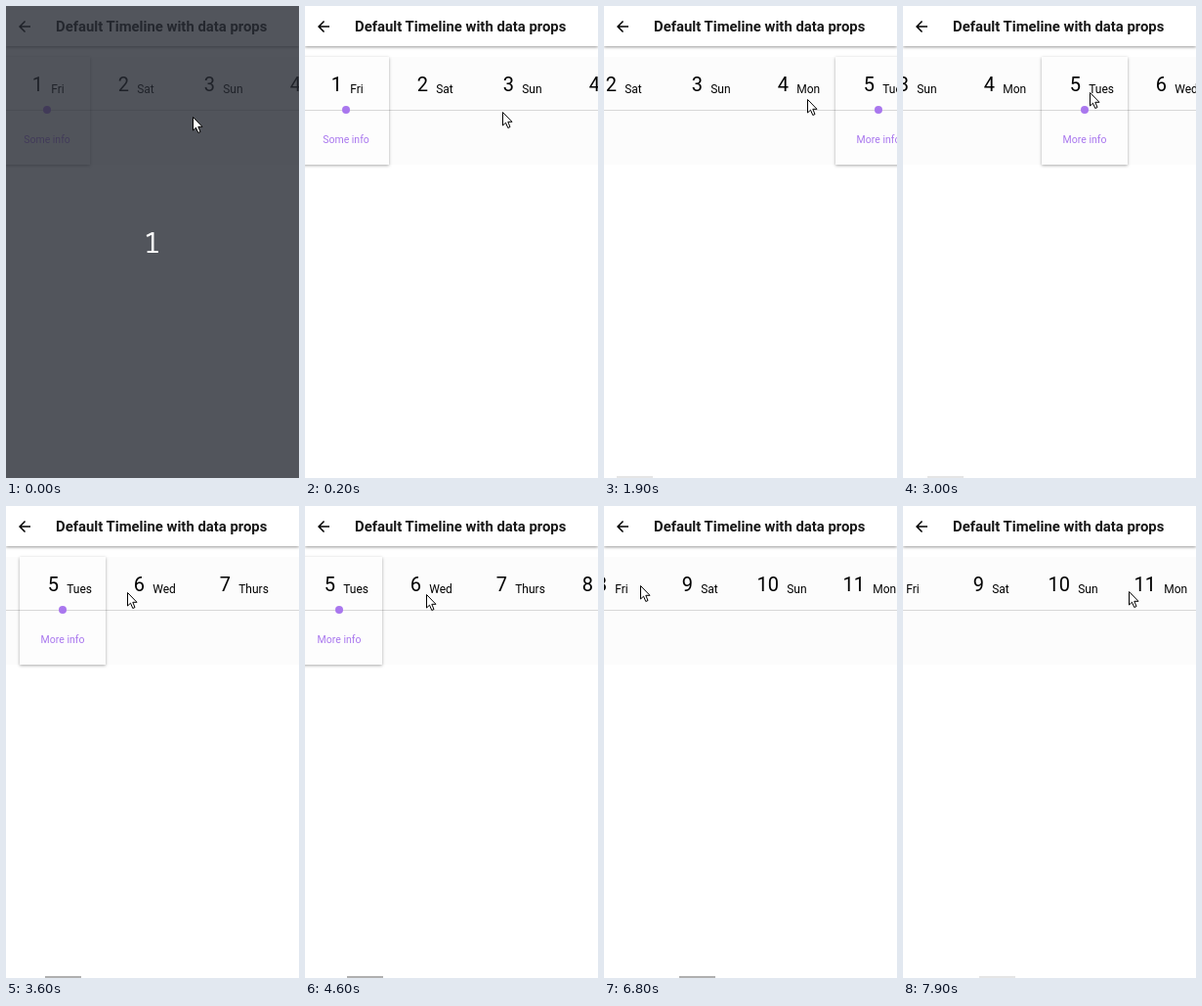
An HTML page for the animation above (8000 ms loop, 300x482 px).

```html
<!DOCTYPE html>
<html lang="en">
<head>
<meta charset="utf-8">
<title>Timeline</title>
<style>
  html, body { margin: 0; width: 100%; height: 100%; overflow: hidden; background: #fff; }
  #stage { position: relative; width: 300px; height: 482px; overflow: hidden; background: #fff;
    font-family: Roboto, sans-serif; color: #000; white-space: nowrap; }
  #stage div, #stage svg { position: absolute; }
  #header { left: 0; top: 0; width: 300px; height: 41px; background: #fff;
    box-shadow: 0 1px 3px rgba(0, 0, 0, .42); }
  #header svg { left: 10px; top: 12px; }
  #title { left: 51px; top: 12px; font: 700 14.87px/18px Roboto, sans-serif; color: #171717; }
  #band { left: 0; top: 52px; width: 300px; height: 110px; background: #fcfcfc; }
  #track, #dots { left: 0; top: 52px; }
  .day { top: 0; width: 88px; height: 110px; }
  .card { left: -2px; top: 0; width: 88px; height: 110px; background: #fdfdfd;
    box-shadow: 0 1px 3px rgba(0, 0, 0, .34); }
  .num { right: 50px; top: 16px; font-size: 20px; line-height: 24px; }
  .name { left: 46.2px; top: 25px; font-size: 12px; line-height: 16px; }
  .line { left: 0; top: 106px; width: 300px; height: 1px; background: rgba(0, 0, 0, .15); }
  .dot { top: 50px; width: 8px; height: 8px; border-radius: 50%; background: #a977ee; }
  .info { left: -2px; width: 88px; top: 77px; text-align: center; font-size: 10.5px;
    line-height: 16px; color: #a977ee; }
  #bar { left: 0; top: 480px; width: 37px; height: 2px; background: #b0b0b0; }
  #shade { inset: 0; background: rgba(39, 43, 52, .8); }
  #count { left: 0; width: 299px; top: 223px; text-align: center; color: #fff;
    font: 29px/36px "Noto Sans Mono", monospace; }
  #cursor { left: 0; top: 0; overflow: visible; }
</style>
</head>
<body>
<div id="stage">
  <div id="band"></div>
  <div id="track"></div>
  <div class="line"></div>
  <div id="dots"></div>
  <div id="header">
    <svg width="18" height="18" viewBox="0 0 24 24"><path d="M20 11H7.83l5.59-5.59L12 4l-8 8 8 8 1.41-1.41L7.83 13H20z"/></svg>
    <div id="title">Default Timeline with data props</div>
  </div>
  <div id="bar"></div>
  <div id="shade"><div id="count">1</div></div>
  <svg id="cursor" width="11" height="18"><path d="M.5.5V14L3.5 11.2 5.8 16.5 8 15.5 5.8 10.3H10Z" fill="#fff" stroke="#000" stroke-linejoin="round"/></svg>
</div>
<script>
const LOOP = 8000, STEP = 100, CELL = 88, SHADE_END = 200;
const names = ["Fri", "Sat", "Sun", "Mon", "Tues", "Wed", "Thurs"];
const infos = { 1: "Some info", 5: "More info" };

// Each swipe grabs at (x, y) and scrolls by dist, slowing down until end.
const swipes = [
  { start: 600, end: 1400, dist: 113, x: 227, y: 98 },
  { start: 1900, end: 2500, dist: 95, x: 208, y: 95 },
  { start: 3000, end: 4600, dist: 151, x: 191, y: 88 },
  { start: 4600, end: 5600, dist: 114, x: 124, y: 90 },
  { start: 6100, end: 7400, dist: 186, x: 126, y: 81 }
];
const rest = { start: 7900, x: 231, y: 87 };

const $ = id => document.getElementById(id);
const clamp = v => Math.min(1, Math.max(0, v));
const part = (t, a, b) => clamp((t - a) / (b - a));
const mix = (a, b, k) => a + (b - a) * k;
const smooth = k => k * k * (3 - 2 * k);
const easeOut = k => 1 - (1 - k) ** 4;

function add(parent, cls, text = "") {
  const el = document.createElement("div");
  el.className = cls;
  el.textContent = text;
  parent.append(el);
  return el;
}

for (let n = 1; n <= 12; n++) {
  const left = (n - 1) * CELL;
  const day = add($("track"), "day");
  day.style.left = left + "px";
  if (infos[n]) {
    add(day, "card");
    add(day, "info", infos[n]);
    add($("dots"), "dot").style.left = left + 38 + "px";
  }
  add(day, "num", n);
  add(day, "name", names[(n - 1) % 7]);
}

function scrollAt(t) {
  return swipes.reduce((sum, s) => sum + s.dist * easeOut(part(t, s.start, s.end)), 0);
}

// The bar stays while scrolling, then fades after a short wait.
function barAt(t) {
  const last = swipes.findLast(s => s.start < t);
  return last ? 1 - part(t, last.end + 300, last.end + 600) : 0;
}

// The pointer pulls left for half a swipe, then goes to the next grab point.
function pointerAt(t) {
  if (t < SHADE_END) return [191, 113];
  const i = swipes.findLastIndex(s => s.start <= t);
  const next = swipes[i + 1] || rest;
  if (i < 0) {
    const k = part(t, SHADE_END, next.start - STEP);
    return [mix(202, next.x, k), mix(108, next.y, k)];
  }
  const s = swipes[i], release = (s.start + s.end) / 2;
  const pulled = s.x - Math.min(s.dist, 90) * part(t, s.start, release);
  const k = smooth(part(t, release, next.start));
  return [mix(pulled, next.x, k), mix(s.y, next.y, k)];
}

function draw(now) {
  const t = Math.floor((now % LOOP) / STEP) * STEP;
  const s = Math.round(scrollAt(t));
  const [x, y] = pointerAt(t).map(Math.round);
  $("track").style.transform = $("dots").style.transform = `translateX(${-s}px)`;
  $("bar").style.transform = `translateX(${Math.round(s * .119)}px)`;
  $("bar").style.opacity = barAt(t);
  $("cursor").style.transform = `translate(${x}px, ${y}px)`;
  $("shade").style.display = t < SHADE_END ? "block" : "none";
}

const start = performance.now();
function tick() {
  draw(performance.now() - start);
  requestAnimationFrame(tick);
}
tick();
</script>
</body>
</html>
```
